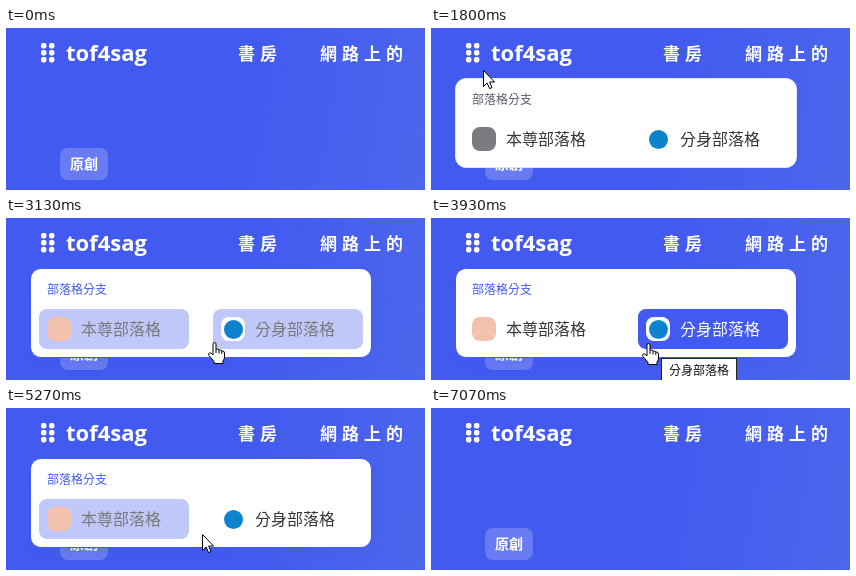
Animation of 419 by 162 pixels, one loop 7.19 s. Source, as an HTML page:

```html
<!DOCTYPE html>
<html lang="zh-Hant">
<head>
<meta charset="utf-8">
<title>Blog menu</title>
<style>
html, body { margin: 0; width: 100%; height: 100%; overflow: hidden; }
body { font-family: "Noto Sans CJK TC", "Noto Sans CJK JP", "Noto Sans CJK", sans-serif; }
div, svg { position: absolute; box-sizing: border-box; white-space: nowrap; }
#stage {
  left: 0; top: 0; width: 419px; height: 162px; overflow: hidden; color: #fff;
  background: linear-gradient(100deg, #425aef 55%, #4c66ec);
}
.name { left: 60px; top: 9px; font: bold 22px/30px "Open Sans", "Noto Sans", sans-serif; }
.nav { top: 10px; font-size: 17px; line-height: 30px; font-weight: bold; letter-spacing: 5px; }
.tag {
  left: 54px; top: 120px; width: 48px; height: 32px; border-radius: 8px;
  background: rgba(255, 255, 255, .2); font-size: 14px; line-height: 31px; font-weight: bold; text-align: center;
}
#panel {
  left: 24px; top: 50px; width: 342px; height: 90px; border: 1px solid; border-radius: 11px; background: #fff;
}
#head { left: 16px; top: 10px; font-size: 12px; line-height: 20px; }
.item { top: 40px; width: 150px; height: 40px; border-radius: 8px; }
.item span { position: absolute; left: 42px; font-size: 16px; line-height: 38px; }
.icon { left: 8px; top: 8px; width: 24px; height: 24px; border-radius: 8px; background: #fff; }
.dot { left: 2.5px; top: 2.5px; width: 19px; height: 19px; border-radius: 50%; background: #0e83cd; }
#tip {
  width: 76px; height: 24px; border: 1px solid #222; background: #fff; color: #111;
  padding-left: 7px; font-size: 12px; line-height: 21px;
}
svg { left: 0; top: 0; overflow: visible; }
</style>
</head>
<body>
<div id="stage">
  <svg id="grip" width="60" height="40" fill="#fff"></svg>
  <div class="name">tof4sag</div>
  <div class="nav" style="left:232px">書房</div>
  <div class="nav" style="left:314px">網路上的</div>
  <div class="tag">原創</div>
  <div id="panel">
    <div id="head">部落格分支</div>
    <div class="item" style="left:8px"><div class="icon" id="avatar"></div><span>本尊部落格</span></div>
    <div class="item" style="left:182px"><div class="icon"><div class="dot"></div></div><span>分身部落格</span></div>
  </div>
  <div id="tip"></div>
  <svg id="arrow" width="13" height="20" fill="#fff" stroke="#000">
    <path d="M.5.5V16.5L4.1 13 6.6 18.6 9 17.5 6.6 12H11.6Z"/>
  </svg>
  <svg id="hand" width="18" height="23" fill="#fff" stroke="#000">
    <path d="M5 2Q5 .5 6.5.5T8 2V7Q10.5 6.5 11 8Q13.3 7.5 13.8 9Q16.5 8.6 16.5 11V15Q16.5 17 15 19V21.5H6V19.5L1 13.5Q0 11.5 1.5 10.8Q3 10.5 5 13Z"/>
    <path fill="none" d="M8 7V11M11 8V11.5M13.8 9V12"/>
  </svg>
</div>
<script>
const LOOP = 7190, RATE = 15 / 1000;
const BLUE = [66, 90, 239], WHITE = [255, 255, 255], INK = [54, 54, 54], LINE = [227, 232, 247];
const GREY = [125, 122, 130], PEACH = [243, 194, 174], MUTED = [90, 90, 110];
const $ = id => document.getElementById(id);
const items = [...document.querySelectorAll(".item")];
const names = items.map(el => el.textContent.trim());

// Pointer stops: step, x, y
const path = [
  [7, 339, 116], [17, 47, 39], [18, 44, 34], [22, 43, 32], [25, 43, 32], [35, 131, 126],
  [39, 131, 126], [41, 137, 127], [49, 221, 124], [58, 221, 124], [59, 217, 125], [66, 161, 125],
  [75, 161, 125], [83, 230, 126], [100, 230, 126], [105, 365, 150]
];
// Tooltips: first step, last step, item, x, y
const tips = [[39, 45, 0, 140, 142], [53, 60, 1, 230, 140], [69, 77, 0, 170, 140], [87, 101, 1, 238, 141]];

const clamp = v => Math.max(0, Math.min(1, v));
const ramp = (n, a, b) => clamp((n - a) / (b - a));
const mix = (a, b, p) => `rgb(${a.map((v, i) => Math.round(v + (b[i] - v) * p))})`;
const show = (el, on) => { el.style.visibility = on ? "visible" : "hidden"; };
const place = (el, x, y) => { el.style.transform = `translate(${x}px,${y}px)`; };

function pointer(n) {
  let i = 0;
  while (i < path.length - 2 && n > path[i + 1][0]) i++;
  const [a, x, y] = path[i], [b, u, v] = path[i + 1];
  const p = ramp(n, a, b), e = p * p * (3 - 2 * p);
  return [Math.round(x + (u - x) * e), Math.round(y + (v - y) * e)];
}

const inside = (n, x, y, w, h) => {
  const [px, py] = pointer(n);
  return n > 22 && px >= x && px < x + w && py >= y && py < y + h;
};
const onItem = (n, i) => inside(n, 33 + 174 * i, 91, 150, 40);
const onPanel = n => inside(n, 24, 50, 342, 90);
// Hover state smoothed over the last three steps
const fade = (test, n) => (test(n) + test(n - 1) + test(n - 2)) / 3;

function draw(t) {
  const n = Math.floor(t * RATE + .08);
  const panel = $("panel").style;
  const open = (1 - Math.pow(1 - ramp(n, 17, 22), 1.4)) * (1 - ramp(n, 101, 106));
  panel.opacity = open;
  panel.transform = `translateY(${Math.round(12 * (1 - open))}px)`;
  const lit = n > 95 ? 1 : fade(onPanel, n);
  panel.borderColor = mix(LINE, BLUE, lit);
  panel.boxShadow = `0 8px 12px -3px rgba(66,90,239,${.14 * lit})`;
  $("head").style.color = mix(MUTED, BLUE, lit);
  $("avatar").style.background = mix(GREY, PEACH, lit);

  items.forEach((el, i) => {
    const p = fade(k => onItem(k, i), n);
    el.style.background = mix(WHITE, BLUE, p);
    el.style.color = mix(INK, WHITE, p);
  });

  const tip = tips.find(([a, b]) => n >= a && n <= b);
  show($("tip"), tip);
  if (tip) {
    $("tip").textContent = names[tip[2]];
    place($("tip"), tip[3], tip[4]);
  }

  const [x, y] = pointer(n);
  const seen = n >= 7 && n < 106, link = onItem(n, 0) || onItem(n, 1);
  show($("arrow"), seen && !link);
  show($("hand"), seen && link);
  place($("arrow"), x, y);
  place($("hand"), x - 6, y);
}

for (let i = 0; i < 6; i++) {
  const r = document.createElementNS("http://www.w3.org/2000/svg", "rect");
  const box = { x: 35 + 8 * (i % 2), y: 15 + 7 * (i >> 1), width: 5.4, height: 5.4, rx: 1.8 };
  for (const key in box) r.setAttribute(key, box[key]);
  $("grip").append(r);
}

const start = performance.now();
function tick() {
  draw((performance.now() - start) % LOOP);
  requestAnimationFrame(tick);
}
tick();
</script>
</body>
</html>
```
